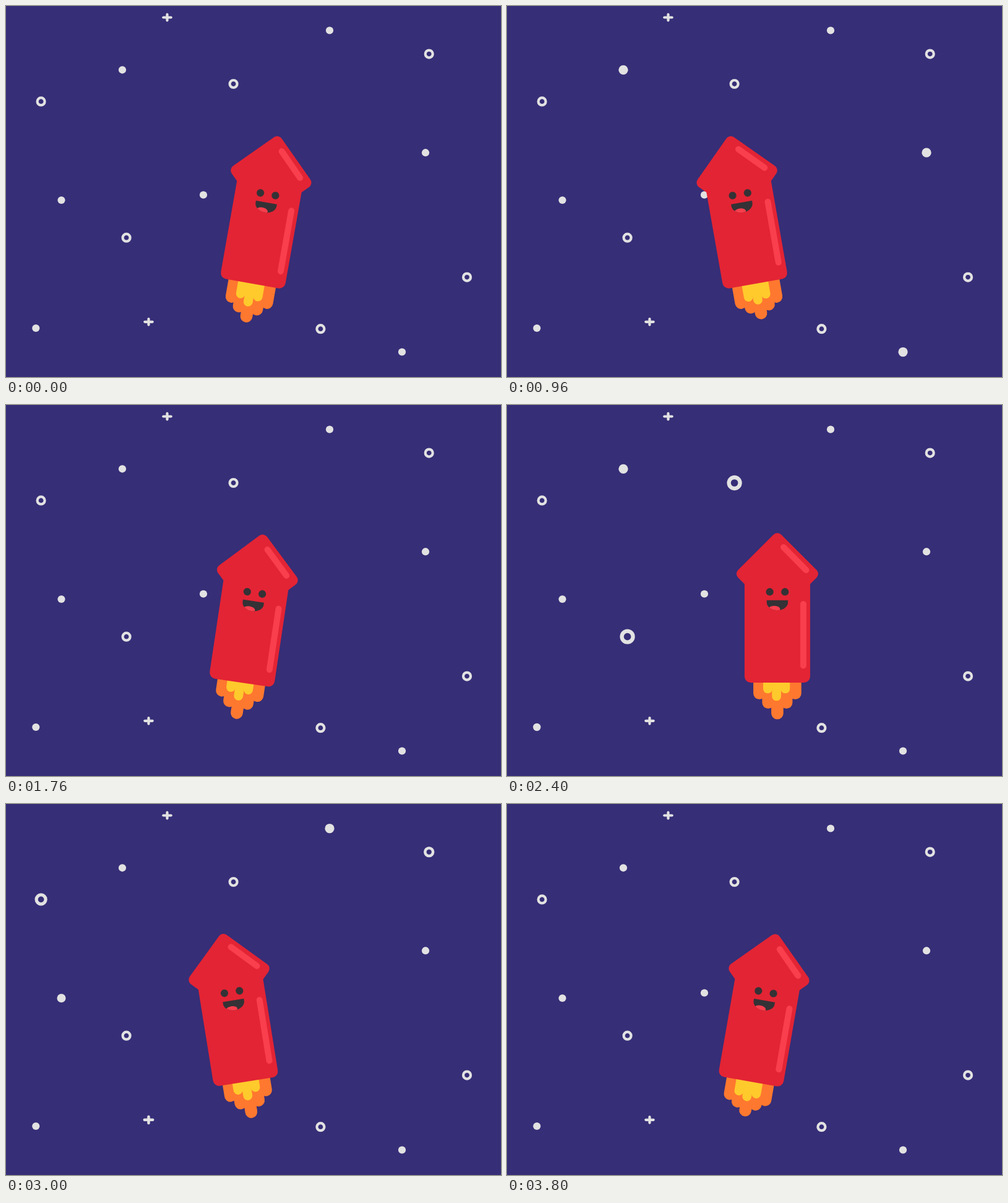
An HTML page with a canvas for the animation above (3.84 s loop, 800x600 px).

```html
<!DOCTYPE html>
<html lang="en">
<head>
<meta charset="utf-8">
<title>Happy rocket</title>
<style>
  html, body { margin: 0; width: 100%; height: 100%; overflow: hidden; background: #362e77; }
  canvas { display: block; width: 800px; height: 600px; }
</style>
</head>
<body>
<canvas id="stage" width="800" height="600"></canvas>
<script>
const ctx = document.getElementById('stage').getContext('2d');
const LOOP = 3840, STEP = 40, SWING = 1920, FLICKER = 320, TAU = Math.PI * 2;
const COLOR = {
  sky: '#362e77', star: '#e2e2e2', red: '#e32434', shine: '#f93e4d', dark: '#343236',
  orange: '#ff782f', yellow: '#ffca2c', magenta: '#dd47dc'
};

// kind, x, y, times at which the star swells
const stars = [
  ['plus', 260.5, 18.5, 520, 2690], ['plus', 230.5, 510.8, 1420, 3120],
  ['dot', 523, 39.5, 1320, 3080], ['dot', 188, 103.3, 880, 2320],
  ['dot', 678, 237.2, 880, 2640], ['dot', 319, 305.5, 320, 2200],
  ['dot', 89.5, 314, 1400, 3100], ['dot', 48.3, 521, 300, 2260],
  ['dot', 640, 559.5, 880, 2660],
  ['ring', 683.7, 77.6, 1580, 3120], ['ring', 367.6, 126, 700, 2400],
  ['ring', 56.6, 154.4, 1480, 3080], ['ring', 194.6, 374.7, 700, 2400],
  ['ring', 745, 438.6, 320, 2240], ['ring', 508.4, 522.2, 300, 2220]
];

// rings: radius, rays, first angle in degrees, line width, delay, centre shift
const twin = [[123, 15, 0, 9.5, 0, 0], [51.5, 15, 10, 6, 53, 1]];
const bursts = [
  { x: 276, y: 490, start: 380, color: COLOR.yellow, rings: twin },
  { x: 276, y: 490, start: 1860, color: COLOR.yellow, rings: twin },
  { x: 181.5, y: 449.3, start: 2420, color: COLOR.magenta, rings: twin },
  { x: 596.5, y: 434, start: 3024, color: COLOR.orange, rings: [[55.3, 6, 20, 12, 0, 0]] }
];
const BURST_TIME = 480;

const clamp = v => Math.min(1, Math.max(0, v));
const smooth = v => { v = clamp(v); return v * v * (3 - 2 * v); };
const easeOut = v => 1 - (1 - clamp(v)) ** 2;

// Eased swing from -1 to 1 and back
function sway(t) {
  const phase = ((t / SWING) % 1 + 1) % 1 * 2;
  return 2 * smooth(phase < 1 ? phase : 2 - phase) - 1;
}

function bump(t, peak) {
  const d = Math.abs(t - peak) / 160;
  return d < 1 ? Math.cos(d * Math.PI / 2) ** 2 : 0;
}

function disc(x, y, r, color) {
  ctx.fillStyle = color;
  ctx.beginPath();
  ctx.arc(x, y, r, 0, TAU);
  ctx.fill();
}

function line(x1, y1, x2, y2, width, color) {
  ctx.strokeStyle = color;
  ctx.lineWidth = width;
  ctx.beginPath();
  ctx.moveTo(x1, y1);
  ctx.lineTo(x2, y2);
  ctx.stroke();
}

function drawStar([kind, x, y, ...peaks], t) {
  const scale = 1 + 0.5 * Math.max(...peaks.map(p => bump(t, p)));
  ctx.save();
  ctx.translate(x, y);
  ctx.scale(scale, scale);
  if (kind === 'dot') {
    disc(0, 0, 6.1, COLOR.star);
  } else if (kind === 'ring') {
    ctx.strokeStyle = COLOR.star;
    ctx.lineWidth = 4.2;
    ctx.beginPath();
    ctx.arc(0, 0, 6, 0, TAU);
    ctx.stroke();
  } else {
    line(-6.2, 0, 6.2, 0, 4.2, COLOR.star);
    line(0, -4.8, 0, 4.8, 4.2, COLOR.star);
  }
  ctx.restore();
}

function drawBurst({ x, y, start, color, rings }, t) {
  for (const [radius, rays, first, width, delay, shift] of rings) {
    const p = (t - start - delay) / BURST_TIME;
    if (p <= 0 || p >= 1) continue;
    const outer = radius * easeOut(p / 0.5);
    const inner = radius * easeOut((p - 0.25) / 0.75);
    for (let i = 0; i < rays; i++) {
      const a = first * Math.PI / 180 + i * TAU / rays;
      const dx = Math.sin(a), dy = -Math.cos(a);
      const cx = x + shift, cy = y + shift;
      line(cx + dx * inner, cy + dy * inner, cx + dx * outer, cy + dy * outer, width, color);
    }
  }
}

// Rocket parts use an origin at the middle of the body's bottom edge.
function lobe(x, bottom, r, color) {
  line(x, -12, x, bottom - r, r * 2, color);
}

function drawFlames(t) {
  const pulse = (1 + Math.cos(TAU * t / FLICKER)) / 2;
  const a = TAU * 31 * t / LOOP;
  const jitter = 4.4 * Math.cos(a - Math.PI / 2 + 1.347);
  const mid = 42 + pulse * (5 + 0.6 * jitter);
  const side = 27 + 9.3 * pulse;
  for (const s of [-1, 1]) {
    lobe(s * 29, side, 9.8, COLOR.orange);
    lobe(s * 14.7, mid, 9.8, COLOR.orange);
  }
  lobe(0, 59.3 + pulse * jitter, 9.8, COLOR.orange);
  for (const s of [-1, 1]) lobe(-1.3 + s * 14.2, 17.3 + 9.3 * pulse, 7.4, COLOR.yellow);
  lobe(-1.3, 29.3 + pulse * (5.2 + 0.7 * jitter), 7.4, COLOR.yellow);
}

function hullPath() {
  ctx.beginPath();
  ctx.moveTo(0, -233);
  ctx.lineTo(57, -176);
  ctx.lineTo(0, -119);
  ctx.lineTo(-57, -176);
  ctx.closePath();
}

function drawHull(glow) {
  ctx.fillStyle = ctx.strokeStyle = COLOR.red;
  ctx.lineWidth = 18;
  ctx.lineJoin = 'round';
  hullPath();
  ctx.fill();
  ctx.stroke();
  ctx.beginPath();
  ctx.roundRect(-53, -164, 106, 164, [0, 0, 10, 10]);
  ctx.fill();
  if (glow > 0) {
    ctx.globalAlpha = 0.44 * glow;
    line(-59.5, -171, -48.5, -160, 10, COLOR.magenta);
    line(-47.5, -151, -47.5, -5.5, 11, COLOR.magenta);
    ctx.globalAlpha = 1;
  }
  line(10, -219, 46.5, -182, 10, COLOR.shine);
  line(42, -127, 42, -27.5, 10, COLOR.shine);
}

function drawFace(glance) {
  for (const s of [-1, 1]) disc(s * 12.3 - 7.5 * glance, -146.8 + glance, 6.1, COLOR.dark);
  ctx.save();
  ctx.beginPath();
  ctx.moveTo(-17.2, -133.3);
  ctx.lineTo(17.2, -133.3);
  ctx.lineTo(17.2, -130);
  ctx.ellipse(0, -130, 17.2, 13, 0, 0, Math.PI);
  ctx.closePath();
  ctx.fillStyle = COLOR.dark;
  ctx.fill();
  ctx.clip();
  ctx.fillStyle = COLOR.shine;
  ctx.beginPath();
  ctx.ellipse(-5, -119, 9.5, 5.2, 0, 0, TAU);
  ctx.fill();
  ctx.restore();
}

function drawRocket(t) {
  const glance = smooth((t - 2460) / 160) * (1 - smooth((t - 2800) / 160));
  ctx.save();
  ctx.translate(400 + 37 * sway(t - 19 + SWING / 4), 449);
  ctx.rotate(10 * sway(t + SWING / 2) * Math.PI / 180);
  drawFlames(t);
  drawHull(glance);
  drawFace(glance);
  ctx.restore();
}

function draw() {
  const t = Math.floor(performance.now() % LOOP / STEP) * STEP;
  ctx.fillStyle = COLOR.sky;
  ctx.fillRect(0, 0, 800, 600);
  ctx.lineCap = 'round';
  for (const b of bursts) drawBurst(b, t);
  for (const s of stars) drawStar(s, t);
  drawRocket(t);
  requestAnimationFrame(draw);
}
draw();
</script>
</body>
</html>
```
